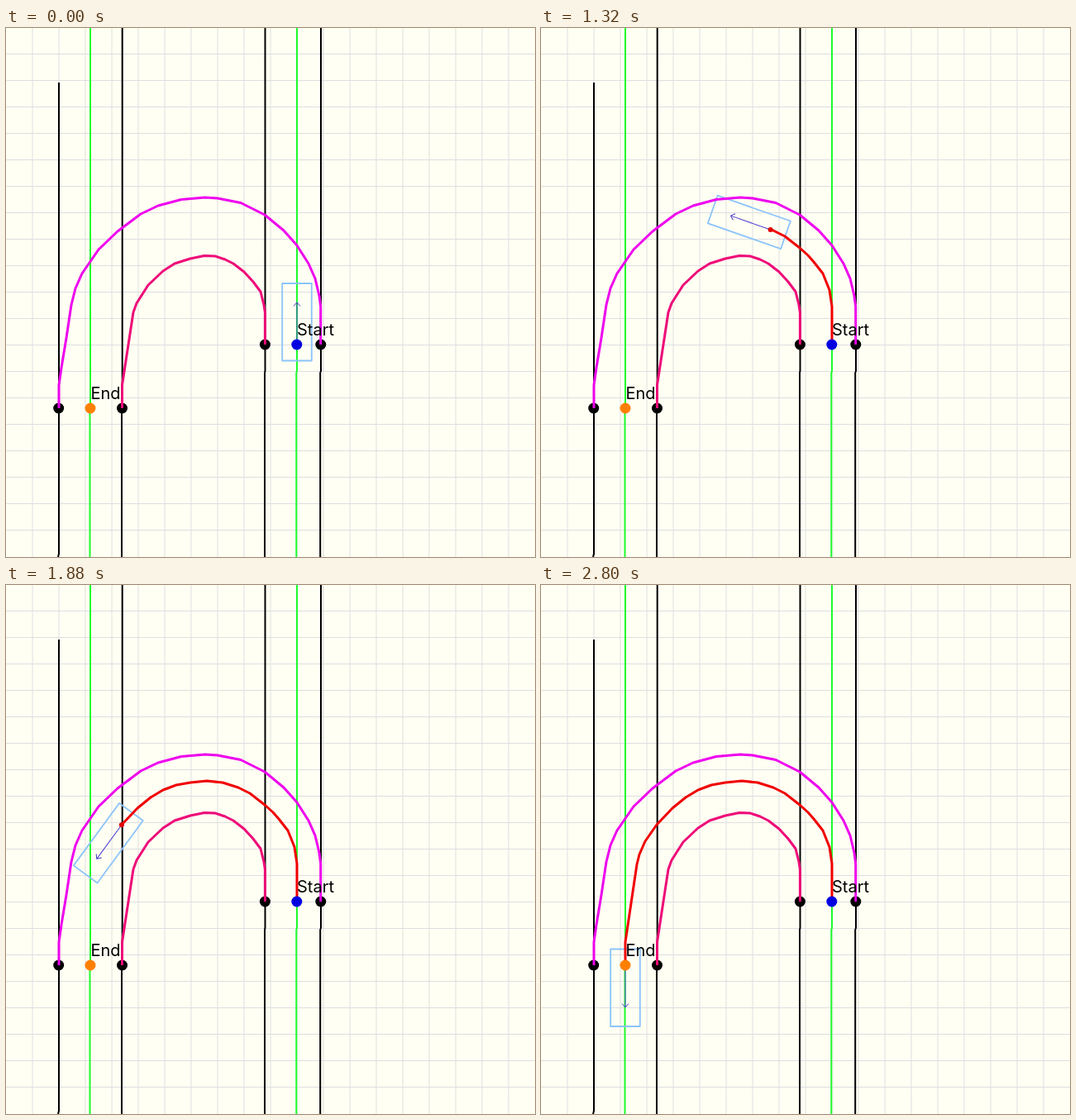
These frames come from a looping animation (640 px wide and 640 px high, 3.56 s). An HTML page:

```html
<!DOCTYPE html>
<html lang="en">
<head>
<meta charset="utf-8">
<title>U-turn path</title>
<style>
  html, body { margin: 0; width: 100%; height: 100%; overflow: hidden; background: #fffff3; }
  svg { display: block; width: 100%; height: 100%; }
  path, rect { fill: none; stroke-linejoin: round; }
  text { font: 400 20px Inter, "Open Sans", sans-serif; fill: #000; }
  .grid { stroke: #dedee2; }
  .lane { stroke: #000; stroke-width: 2; }
  .mid { stroke: #1dfb2b; stroke-width: 2; }
  .edge { stroke-width: 3; }
  .box { stroke: #8cc4fa; stroke-width: 1.8; }
  .arrow { stroke: #4a3ccf; stroke-width: 1; }
</style>
</head>
<body>
<svg viewBox="0 0 640 640">
  <path id="grid" class="grid"/>
  <path class="lane" d="M64 66V636L63 640M140.7 0V460L140 462V640M313.5 0V415L313 417V640M381 0V415L380.2 417V640"/>
  <path class="mid" d="M102 0V460L101.5 462V640M352 0V415L351.3 417V640"/>
  <g id="car">
    <rect class="box" x="-17.8" y="-74" width="35.6" height="93.5"/>
    <path class="arrow" d="M0 0V-51M-4 -46.5L0 -51L4 -46.5"/>
  </g>
  <g>
    <circle cx="63.7" cy="460" r="6.5"/>
    <circle cx="140.5" cy="460" r="6.5"/>
    <circle cx="313.4" cy="383" r="6.5"/>
    <circle cx="380.8" cy="383" r="6.5"/>
  </g>
  <path class="edge" stroke="#ee00ee" d="M64 460V432L67 411L73 375L79 335L84 315L92 297L112 268L135 246L163 225L184 215L212 207.500L241 205L256 206L284 211.500L313 226L336 245L352 263L366 285L374 303L379 324L380.700 337V383"/>
  <path class="edge" stroke="#ee0a78" d="M140.500 460V432L154 344L158 333L172 311L190 294L204 285L223 279L240 275.500L253 276L265 280L275 285L288 295L299 307L308 319L312 335L313.400 344V383"/>
  <path id="trail" class="edge" stroke="#f00000" d="M352 383V337L349 317L341 297L330 283L323 275L313 266L295 252L281 245L262 239L243 237L223 239L206 242L190 248L175 257L159 270L140 290L126 310L119 326L116 338L102 432V460"/>
  <circle id="dot" r="3" fill="#e00000"/>
  <circle cx="351.800" cy="383" r="6.500" fill="#0000e0"/>
  <circle cx="102" cy="460" r="6.500" fill="#ff8000"/>
  <text x="352" y="372">Start</text>
  <text x="102.500" y="448.500">End</text>
</svg>
<script>
const $ = id => document.getElementById(id);
const car = $('car'), trail = $('trail'), dot = $('dot');
const LOOP = 3560, FIRST = 760, TICK = 40, LAST = 35;

// Steps that are held for two ticks
const held = new Set([3, 7, 10, 13, 17, 20, 24, 27, 31, 34]);

// [step, distance along the path, heading in degrees]
const keys = [
  [-1, 0, 0], [0, 15.5, 0], [2, 44, 0], [7, 116.2, -42.6],
  [15, 227.2, -98.9], [20, 299.7, -133.4], [25, 369.2, -159.4],
  [27, 396, -171.6], [32, 464, -171.6], [33, 477.5, -176],
  [34, 491, -180], [LAST, 504.6, -180]
];

let lines = '';
for (let i = 0; i < 19; i++) {
  const p = Math.round(30.5 + 32.05 * i);
  lines += `M${p + 1} 0V640M0 ${p + 0.5}H640`;
}
$('grid').setAttribute('d', lines);

function stepAt(ms) {
  let step = -1;
  for (let t = FIRST; t <= ms && step < LAST;) {
    step++;
    t += held.has(step) ? 2 * TICK : TICK;
  }
  return step;
}

function poseAt(step) {
  const i = Math.max(1, keys.findIndex(k => k[0] >= step));
  const a = keys[i - 1], b = keys[i];
  const u = (step - a[0]) / (b[0] - a[0]);
  return [1, 2].map(n => a[n] + (b[n] - a[n]) * u);
}

function draw(ms) {
  const [dist, angle] = poseAt(stepAt(ms));
  const p = trail.getPointAtLength(dist);
  car.setAttribute('transform', `translate(${p.x} ${p.y}) rotate(${angle})`);
  trail.setAttribute('stroke-dasharray', `${dist} 999`);
  dot.setAttribute('cx', p.x);
  dot.setAttribute('cy', p.y);
}

const start = performance.now();
function frame() {
  draw((performance.now() - start) % LOOP);
  requestAnimationFrame(frame);
}
frame();
</script>
</body>
</html>
```
